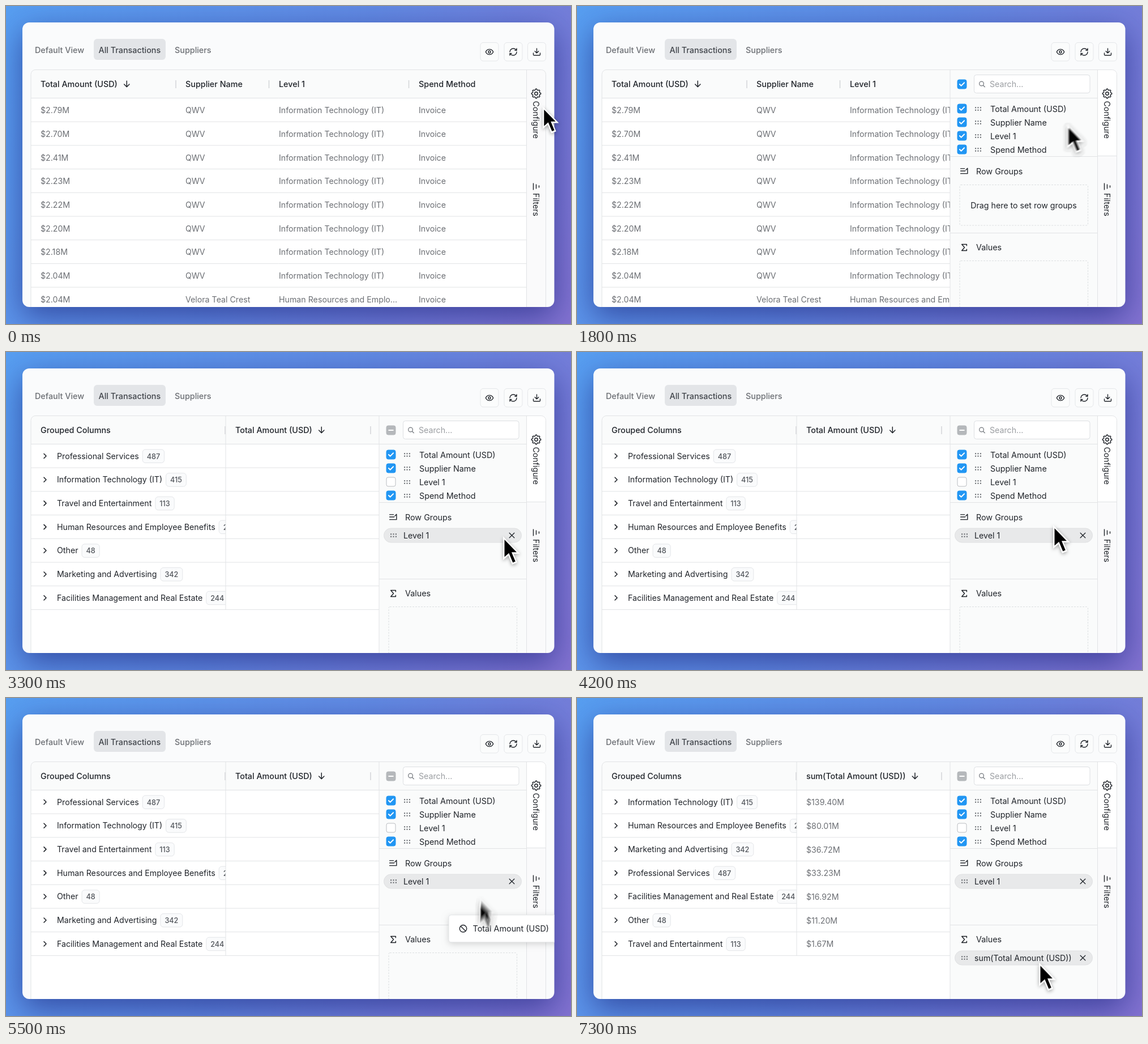
Animation of 998 by 561 pixels, one loop 7400 ms. Source, as an HTML page with a canvas:

```html
<!DOCTYPE html>
<html lang="en">
<head>
<meta charset="utf-8">
<title>Grouping a table</title>
<style>
html, body { margin: 0; width: 100%; height: 100%; overflow: hidden; }
canvas { display: block; width: 998px; height: 561px; }
</style>
</head>
<body>
<canvas id="stage"></canvas>
<script>
const W = 998, H = 561, LOOP = 7400, STEP = 100;
const ROW = 41.7, TOP = 162.5, PANEL = 659, SIDE = 919.5, FLOOR = 531;
const BODY = 14.2, LABEL = 14.35;
const INK = '#20242a', GREY = '#6c6f74', LINE = '#e1e3e5', FAINT = '#9fa2a5', PALE = '#fafbfb';
const T = { open: 200, grab1: 2300, hide: 2700, drop1: 3100, group: 3200, grab2: 5100, over2: 5700, drop2: 5900 };

const dpr = window.devicePixelRatio || 1;

function prepare(canvas, w, h) {
  canvas.width = w * dpr;
  canvas.height = h * dpr;
  return canvas.getContext('2d');
}
const g = prepare(document.getElementById('stage'), W, H);

const amounts = ['2.79', '2.70', '2.41', '2.23', '2.22', '2.20', '2.18', '2.04', '2.04'];
const counts = {
  'Professional Services': 487,
  'Information Technology (IT)': 415,
  'Travel and Entertainment': 113,
  'Human Resources and Employee Benefits': 263,
  'Other': 48,
  'Marketing and Advertising': 342,
  'Facilities Management and Real Estate': 244
};
const groups = Object.keys(counts);
const sums = [
  [groups[1], '139.40'], [groups[3], '80.01'], [groups[5], '36.72'], [groups[0], '33.23'],
  [groups[6], '16.92'], [groups[4], '11.20'], [groups[2], '1.67']
];
const fields = ['Total Amount (USD)', 'Supplier Name', 'Level 1', 'Spend Method'];

const icons = {
  eye: 'M2 12s3-7 10-7 10 7 10 7-3 7-10 7-10-7-10-7Z M15 12a3 3 0 1 1-6 0a3 3 0 1 1 6 0',
  refresh: 'M3 12a9 9 0 0 1 9-9 9.75 9.75 0 0 1 6.74 2.74L21 8 M21 3v5h-5 M21 12a9 9 0 0 1-9 9 9.75 9.75 0 0 1-6.74-2.74L3 16 M8 16H3v5',
  download: 'M21 15v4a2 2 0 0 1-2 2H5a2 2 0 0 1-2-2v-4 M7 10l5 5 5-5 M12 15V3',
  arrow: 'M12 3V21 M4 13l8 8 8-8',
  chevron: 'M8 4l8 8-8 8',
  cross: 'M4 4L20 20 M20 4L4 20',
  check: 'M3 12l6 6L21 6',
  search: 'M18 10a8 8 0 1 1-16 0a8 8 0 1 1 16 0 M16 16l6 6',
  rows: 'M1 5H13 M1 12H15 M1 20H22 M22 20V5 M17 9l5-5',
  sigma: 'M20 6V2H4l9 10-9 10H20v-4',
  banned: 'M22 12a10 10 0 1 1-20 0a10 10 0 1 1 20 0 M5 5L19 19',
  move: 'M12 2V22 M2 12H22 M9 5l3-3 3 3 M9 19l3 3 3-3 M5 9l-3 3 3 3 M19 9l3 3-3 3'
};

// Pointer: time, x, y, scale
const path = [
  [0, 948, 177, .95], [100, 948, 177, .9], [200, 948, 177, .9], [500, 948, 177, 1],
  [1200, 948, 177, 1], [2100, 837, 220, 1], [2300, 837, 220, .9], [3000, 878, 325, .9],
  [3100, 878, 325, .9], [3300, 878, 325, 1], [3800, 841, 305, 1], [4400, 841, 305, 1],
  [4950, 867, 192, 1], [5100, 867, 192, .9], [5800, 816, 466, .9], [6000, 816, 466, .9],
  [6200, 816, 466.5, 1], [LOOP, 816, 466.5, 1]
];

function pointer(t) {
  let i = 1;
  while (i < path.length - 1 && path[i][0] < t) i++;
  const a = path[i - 1], b = path[i];
  const u = Math.min(1, Math.max(0, (t - a[0]) / (b[0] - a[0])));
  const e = u * u * (3 - 2 * u);
  const [x, y, s] = [1, 2, 3].map(k => a[k] + (b[k] - a[k]) * e);
  return { x, y, s };
}

function setFont(size, weight) {
  g.font = `${weight} ${size}px Inter, sans-serif`;
}

function text(str, x, mid, color = INK, weight = 400, size = BODY) {
  setFont(size, weight);
  g.fillStyle = color;
  g.fillText(str, x, mid + size * .36);
}

function line(x1, y1, x2, y2, color = LINE, width = 1) {
  g.beginPath();
  g.moveTo(x1, y1);
  g.lineTo(x2, y2);
  g.strokeStyle = color;
  g.lineWidth = width;
  g.stroke();
}

function box(x, y, w, h, r, fill, stroke) {
  g.beginPath();
  g.roundRect(x, y, w, h, r);
  if (fill) { g.fillStyle = fill; g.fill(); }
  if (stroke) { g.strokeStyle = stroke; g.lineWidth = 1; g.stroke(); }
}

function icon(name, x, y, size, color = INK, width = 1.4) {
  const k = size / 24;
  g.save();
  g.translate(x - size / 2, y - size / 2);
  g.scale(k, k);
  g.strokeStyle = color;
  g.lineWidth = width / k;
  g.lineCap = g.lineJoin = 'round';
  g.stroke(new Path2D(icons[name]));
  g.restore();
}

function clipped(x, y, w, h, r, draw) {
  g.save();
  g.beginPath();
  g.roundRect(x, y, w, h, r);
  g.clip();
  draw();
  g.restore();
}

function withShadow(ctx, color, blur, dy, draw) {
  ctx.save();
  ctx.shadowColor = color;
  ctx.shadowBlur = blur * dpr;
  ctx.shadowOffsetY = dy * dpr;
  draw();
  ctx.restore();
}

function grip(x, y, color = '#5e6267') {
  g.fillStyle = color;
  for (let i = 0; i < 6; i++) {
    g.fillRect(x - 5.4 + (i % 3) * 4.4, y - 3.2 + (i > 2) * 4.4, 2, 2);
  }
}

function checkbox(y, state) {
  const fill = { on: '#2196f3', off: '#ffffff', mixed: '#b5b8bb' }[state];
  box(672, y - 8, 16, 16, 3, fill, state === 'off' ? '#babdc1' : fill);
  if (state === 'on') icon('check', 680, y, 11, '#fff', 1.8);
  if (state === 'mixed') line(675.5, y, 684.5, y, '#fff', 2);
}

function backdrop() {
  const sky = g.createLinearGradient(0, 0, W, H);
  sky.addColorStop(0, '#569df0');
  sky.addColorStop(.5, '#6189e2');
  sky.addColorStop(1, '#8271d0');
  g.fillStyle = sky;
  g.fillRect(0, 0, W, H);
  withShadow(g, 'rgba(22, 30, 120, .6)', 54, 17, () => box(29, 29, 939.5, 502, 12, '#fafbfc'));
}

function toolbar() {
  text('Default View', 51, 77.5, GREY, 500, LABEL);
  box(155, 58, 127, 37, 6, '#e3e5e8');
  text('All Transactions', 163.5, 77.5, '#41454b', 500, LABEL);
  text('Suppliers', 298, 77.5, GREY, 500, LABEL);
  [['eye', 854], ['refresh', 896], ['download', 937.5]].forEach(([name, x]) => {
    box(x - 16, 64.5, 32, 32.5, 5, '#fbfcfc', '#e5e7ea');
    icon(name, x, 81, 16);
  });
}

function header(str, x, arrow) {
  text(str, x, 138, INK, 500, LABEL);
  if (arrow) icon('arrow', x + g.measureText(str).width + 16.5, 137.5, 14, INK, 1.5);
}

function handle(x) {
  line(x, 131, x, 145, '#d3d5d8', 1.5);
}

function flatTable(t) {
  const hidden = t >= T.hide;
  const u = Math.min(1, Math.max(0, (t - T.hide) / 200));
  const spendX = 729 - 247 * (1 - (1 - u) ** 2);
  header('Total Amount (USD)', 61, true);
  header('Supplier Name', 317, false);
  handle(300);
  handle(464.5);
  if (!hidden) {
    header('Level 1', 482, false);
    handle(711.5);
  }
  header('Spend Method', spendX, false);
  amounts.forEach((amount, i) => {
    const y = 184 + ROW * i, last = i === 8;
    line(44, TOP + ROW * (i + 1), SIDE, TOP + ROW * (i + 1));
    text(`$${amount}M`, 61, y, GREY);
    text(last ? 'Velora Teal Crest' : 'QWV', 317, y, GREY);
    if (!hidden) text(last ? 'Human Resources and Emplo...' : 'Information Technology (IT)', 482, y, GREY);
    text('Invoice', spendX, y, GREY);
  });
}

function groupRow(name, y) {
  icon('chevron', 69, y, 12, INK, 1.6);
  text(name, 90, y);
  const x = 90 + g.measureText(name).width + 6.5;
  setFont(12.6, 500);
  const w = g.measureText(counts[name]).width + 15;
  box(x, y - 11.5, w, 23.5, 5, '#fafbfc', '#e3e5e8');
  text(String(counts[name]), x + 7.5, y + .5, '#50545a', 500, 12.6);
}

function groupedTable(summed) {
  header('Grouped Columns', 61, false);
  header(summed ? 'sum(Total Amount (USD))' : 'Total Amount (USD)', 405, true);
  handle(387);
  handle(644);
  groups.forEach((name, i) => {
    const y = 183.5 + ROW * i, edge = TOP + ROW * (i + 1);
    clipped(44, y - 20, 344, 41, 0, () => groupRow(summed ? sums[i][0] : name, y));
    if (summed) text(`$${sums[i][1]}M`, 405, y + .5, GREY);
    line(44, edge, SIDE, edge);
  });
  line(388, 112.5, 388, TOP + ROW * 7);
}

function dashed(y, h) {
  g.save();
  g.setLineDash([3, 2]);
  box(676, y, 226.5, h, 2, null, '#dcdfe1');
  g.restore();
}

function chip(str, y, solid) {
  box(667.5, y - 12.5, 243, 25, 12.5, solid ? '#e8e9ea' : '#f0f1f2', solid ? '#dfe0e2' : '#eff0f1');
  grip(684.5, y, solid ? '#5e6267' : FAINT);
  text(str, 702, y, solid ? INK : FAINT);
  if (solid) icon('cross', 893.5, y, 13, INK, 1.3);
}

function panel(t) {
  const hidden = t >= T.hide;
  g.fillStyle = PALE;
  g.fillRect(PANEL, 112, SIDE - PANEL, FLOOR - 112);
  line(PANEL, 112, PANEL, FLOOR);
  [TOP, 265.5, 400.5].forEach(y => line(PANEL, y, SIDE, y));

  checkbox(138, hidden ? 'mixed' : 'on');
  box(701.5, 121.5, 204.5, 32, 4, '#fff', '#dcdfe2');
  icon('search', 715.5, 138, 11.5, '#777b80', 1.3);
  text('Search...', 729, 138, '#9a9da1');
  fields.forEach((name, i) => {
    const y = 181.5 + 24 * i;
    checkbox(y - .5, hidden && i === 2 ? 'off' : 'on');
    grip(708.5, y);
    text(name, 730, y + .5, INK, 400, LABEL);
  });

  icon('rows', 684, 291, 14, INK, 1.4);
  text('Row Groups', 705, 291.5, INK, 400, LABEL);
  if (hidden) {
    chip('Level 1', 323.5, t >= T.drop1);
  } else {
    dashed(315.5, 71.5);
    g.textAlign = 'center';
    text('Drag here to set row groups', 789, 352);
    g.textAlign = 'left';
  }

  icon('sigma', 684, 426, 13, INK, 1.5);
  text('Values', 705, 426, INK, 400, LABEL);
  if (t >= T.drop2) chip('sum(Total Amount (USD))', 458.5, true);
  else if (t >= T.over2) chip('Total Amount (USD)', 458.5, false);
  else dashed(449.5, 110);
}

function sideText(str, y) {
  g.save();
  g.translate(936, y);
  g.rotate(Math.PI / 2);
  text(str, 0, 0);
  g.restore();
}

function gear(x, y) {
  g.beginPath();
  for (let i = 0; i <= 96; i++) {
    const a = i / 96 * Math.PI * 2;
    const r = 7.3 + .95 * Math.tanh(1.8 * Math.cos(8 * a));
    g.lineTo(x + r * Math.cos(a), y + r * Math.sin(a));
  }
  g.moveTo(x + 2.7, y);
  g.arc(x, y, 2.7, 0, Math.PI * 2);
  g.strokeStyle = INK;
  g.lineWidth = 1.5;
  g.stroke();
}

function sideBar(open) {
  g.fillStyle = '#fafafb';
  g.fillRect(SIDE, 112, 34.5, FLOOR - 112);
  if (open) {
    g.fillStyle = '#fff';
    g.fillRect(SIDE, 112, 34.5, 152);
    line(SIDE, 264.5, 954, 264.5);
  }
  line(SIDE, 112, SIDE, FLOOR);
  gear(936.5, 154.5);
  sideText('Configure', 167.5);
  [[931.5, 6], [936.5, 4], [941.5, 2]].forEach(([x, r]) => line(x, 318.5 - r, x, 318.5 + r, INK, 1.4));
  sideText('Filters', 330);
}

function ghost(str, x, mid, w, name) {
  withShadow(g, 'rgba(0, 0, 0, .16)', 12, 3, () => box(x, mid - 24, w, 48, 4, '#fff'));
  box(x, mid - 24, w, 48, 4, null, '#e2e4e6');
  icon(name, x + 25.5, mid, 15, INK, 1.4);
  text(str, x + 42.5, mid + .5, INK, 400, LABEL);
}

// Dragged labels run slightly ahead of the smoothed pointer.
function ghosts(t) {
  const p = pointer(t + 90);
  if (t > T.grab1 && t < T.drop1) {
    ghost('Level 1', p.x - 20, p.y + 12, 106, t >= T.hide ? 'move' : 'banned');
  }
  if (t > T.grab2 && t < T.drop2) {
    ghost('Total Amount (USD)', p.x - 45, p.y, 196, t >= T.over2 ? 'move' : 'banned');
  }
}

const PAD = 50, LAYER = 160;
const pose = prepare(document.createElement('canvas'), LAYER, LAYER);
const blur = prepare(document.createElement('canvas'), LAYER, LAYER);
const outer = new Path2D('M0 0V42L9.5 34 16 50 25 46.5 18.5 31H30Z');
const inner = new Path2D('M2.5 6V36.5L10.3 29.8 17.3 46.4 21.8 44.6 15 28.2H24Z');

function drawPose(scale) {
  pose.setTransform(dpr, 0, 0, dpr, 0, 0);
  pose.clearRect(0, 0, LAYER, LAYER);
  pose.translate(PAD, PAD);
  pose.scale(scale, scale);
  pose.fillStyle = '#fff';
  withShadow(pose, 'rgba(0, 0, 0, .35)', 6, 2, () => pose.fill(outer));
  pose.fillStyle = '#000';
  pose.fill(inner);
}

// Averages several poses over a short shutter for motion blur.
function cursor(t) {
  const shutter = 24, now = pointer(t);
  const from = pointer(t - shutter / 2), to = pointer(t + shutter / 2);
  const n = Math.hypot(to.x - from.x, to.y - from.y) < 1 ? 1 : 12;
  drawPose(now.s);
  blur.setTransform(dpr, 0, 0, dpr, 0, 0);
  blur.clearRect(0, 0, LAYER, LAYER);
  blur.globalCompositeOperation = 'lighter';
  blur.globalAlpha = 1 / n;
  for (let i = 0; i < n; i++) {
    const p = n === 1 ? now : pointer(t + shutter * (i / (n - 1) - .5));
    blur.drawImage(pose.canvas, p.x - now.x, p.y - now.y, LAYER, LAYER);
  }
  g.drawImage(blur.canvas, now.x - PAD, now.y - PAD, LAYER, LAYER);
}

function grid(t) {
  const open = t >= T.open;
  g.fillStyle = '#fff';
  g.fillRect(44, 112, 910, 420);
  g.fillStyle = PALE;
  g.fillRect(44, 112, 910, TOP - 112);
  clipped(44, 112, (open ? PANEL : SIDE) - 44, 420, 0, () => {
    line(44, TOP, SIDE, TOP);
    if (t < T.group) flatTable(t);
    else groupedTable(t >= T.drop2);
  });
  if (open) panel(t);
  sideBar(open);
}

function render(t) {
  g.setTransform(dpr, 0, 0, dpr, 0, 0);
  backdrop();
  clipped(29, 29, 939.5, 502, 12, () => {
    toolbar();
    clipped(44, 112, 910, 460, 8, () => grid(t));
    box(44, 112.5, 909.5, 460, 8, null, LINE);
    ghosts(t);
  });
  cursor(t);
}

const start = performance.now();
let shown = -1;
function tick() {
  const t = Math.floor(((performance.now() - start) % LOOP) / STEP) * STEP;
  if (t !== shown) render(shown = t);
  requestAnimationFrame(tick);
}
tick();
</script>
</body>
</html>
```
